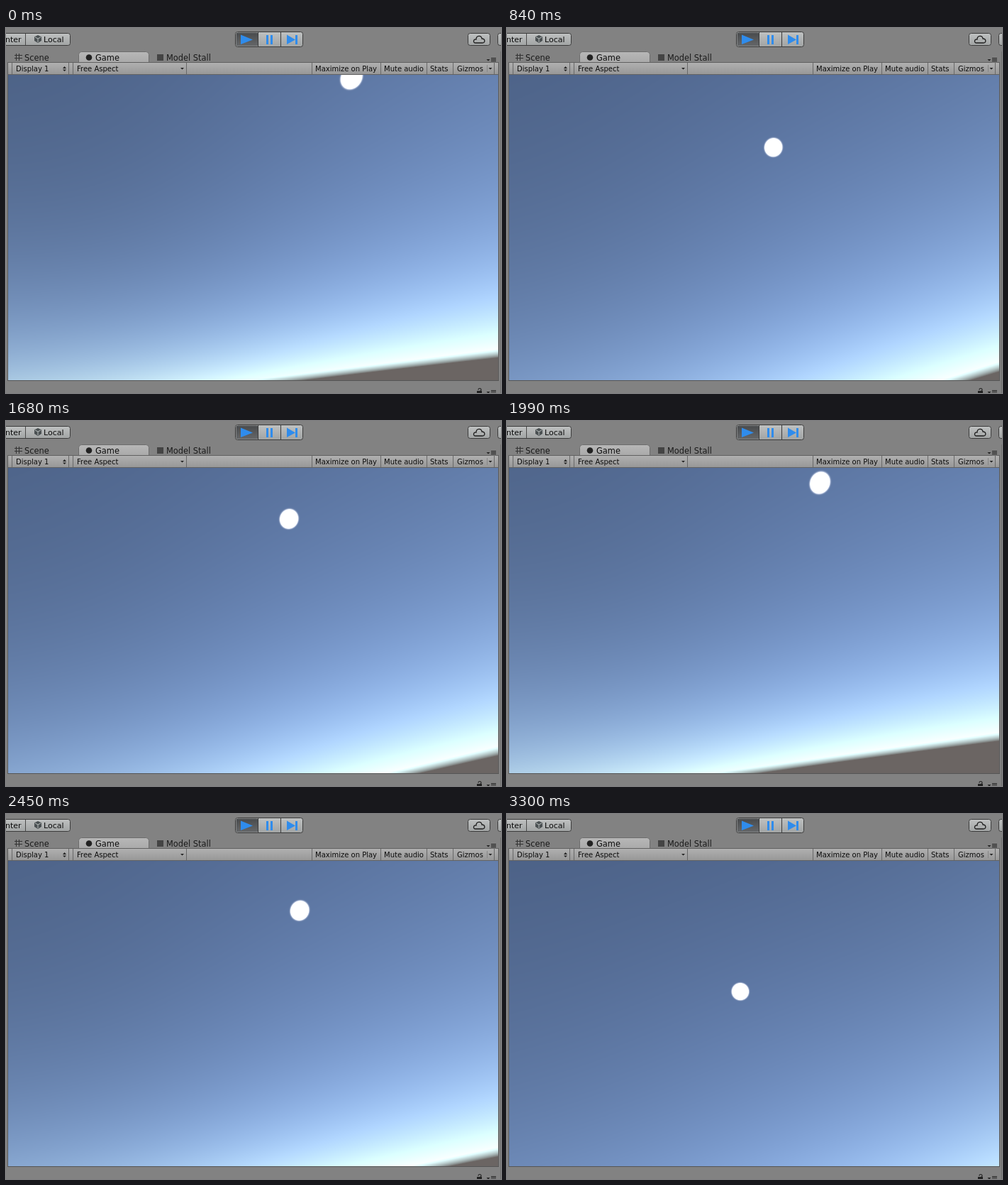
An HTML page with a canvas for the animation above (3.37 s loop, 698x514 px).

```html
<!DOCTYPE html>
<html lang="en">
<head>
<meta charset="utf-8">
<title>Game view</title>
<style>
html, body { margin: 0; width: 100%; height: 100%; overflow: hidden; background: #828282; }
canvas { display: block; }
</style>
</head>
<body>
<canvas id="stage" width="698" height="514"></canvas>
<script>
const ctx = document.getElementById('stage').getContext('2d');
const LOOP = 3370, STEP = 76.7;
const VIEW = { x: 3, y: 66, w: 691, h: 430 };
const FOCAL = VIEW.h / 2 / Math.tan(Math.PI / 6);
const CX = 349, CY = 281;
const SUN_SIN = Math.sin(51.4 * Math.PI / 180);
const SUN_SIZE = 0.04;
const EXPOSURE = 1.3;
const GROUND = [0.369, 0.349, 0.341].map(c => c * c * EXPOSURE);

// time, sun x, sun y, horizon slope
const KEYS = [
  [0, 487, 70, 0.125],
  [380, 466, 122, 0.175],
  [760, 394, 160, 0.27],
  [1050, 333, 185, 0.44],
  [1220, 331, 181, 0.45],
  [1680, 398, 139, 0.24],
  [2080, 450, 76, 0.122],
  [2220, 445, 82, 0.125],
  [2450, 415, 135, 0.21],
  [2680, 350, 202, 0.36],
  [2850, 329, 236, 0.43],
  [3000, 326, 250, 0.43],
  [3220, 329, 253, 0.42],
  [3300, 329, 250, 0.42]
];

function pose(t) {
  const last = KEYS.length - 1;
  let i = 0;
  while (i < last - 1 && KEYS[i + 1][0] <= t) i++;
  const a = KEYS[i], b = KEYS[i + 1];
  const before = KEYS[Math.max(0, i - 1)], after = KEYS[Math.min(last, i + 2)];
  const d = b[0] - a[0], u = Math.min(1, (t - a[0]) / d);
  return [1, 2, 3].map(c => {
    const m0 = (b[c] - before[c]) / (b[0] - before[0]) * d;
    const m1 = (after[c] - a[c]) / (after[0] - a[0]) * d;
    const u2 = u * u, u3 = u2 * u;
    return (2 * u3 - 3 * u2 + 1) * a[c] + (u3 - 2 * u2 + u) * m0
      + (3 * u2 - 2 * u3) * b[c] + (u3 - u2) * m1;
  });
}

// Atmospheric scattering, tabulated over the sine of the elevation
const INV_WAVE = [0.65, 0.57, 0.475].map(w => 1 / w ** 4);
const RAYLEIGH = 0.0025, MIE = 0.001, BRIGHT = 20, OUTER = 1.025, CAM = 1.0001;
const opticalDepth = c => {
  const x = 1 - c;
  return 0.25 * Math.exp(-0.00287 + x * (0.459 + x * (3.83 + x * (-6.8 + x * 5.25))));
};

function scatter(y) {
  const far = Math.sqrt(OUTER * OUTER + y * y - 1) - y;
  const len = far / 2, side = Math.sqrt(1 - y * y);
  const start = Math.exp(-160 * (CAM - 1)) * opticalDepth(y);
  const front = [0, 0, 0];
  for (let s = 0; s < 2; s++) {
    const along = len * (s + 0.5);
    const px = side * along, py = CAM + y * along;
    const height = Math.hypot(px, py);
    const depth = Math.exp(160 * (1 - height));
    const view = (side * px + y * py) / height;
    const path = Math.max(0, start + depth * (opticalDepth(SUN_SIN) - opticalDepth(view)));
    for (let c = 0; c < 3; c++) {
      const k = 4 * Math.PI * (INV_WAVE[c] * RAYLEIGH + MIE);
      front[c] += Math.exp(-path * k) * depth * len * 40;
    }
  }
  return front;
}

const LEVELS = 4096;
const sky = new Float32Array((LEVELS + 1) * 3);
const glow = new Float32Array((LEVELS + 1) * 3);
for (let i = 0; i <= LEVELS; i++) {
  scatter(i / LEVELS).forEach((f, c) => {
    sky[i * 3 + c] = EXPOSURE * f * INV_WAVE[c] * RAYLEIGH * BRIGHT;
    glow[i * 3 + c] = EXPOSURE * f * MIE * BRIGHT * 400 * BRIGHT;
  });
}

const image = ctx.createImageData(VIEW.w, VIEW.h);

function drawSky(t) {
  const [sunX, sunY, slope] = pose(t);
  const sx = sunX - CX, sy = CY - sunY;
  const sunLen = Math.hypot(sx, sy, FOCAL);
  const h = Math.hypot(1, slope), rx = -slope / h, ry = 1 / h;
  // Pitch that keeps the sun at its fixed elevation
  const v = sx * rx + sy * ry;
  const pitch = Math.asin(Math.min(1, sunLen * SUN_SIN / Math.hypot(v, FOCAL))) - Math.atan2(v, FOCAL);
  const ux = rx * Math.cos(pitch), uy = ry * Math.cos(pitch), uz = Math.sin(pitch) * FOCAL;
  const near = 1 - SUN_SIZE * SUN_SIZE / 2;
  const out = image.data;
  let o = 0;
  for (let j = 0; j < VIEW.h; j++) {
    const dy = CY - (VIEW.y + j + 0.5);
    for (let i = 0; i < VIEW.w; i++) {
      const dx = VIEW.x + i + 0.5 - CX;
      const len = Math.sqrt(dx * dx + dy * dy + FOCAL * FOCAL);
      const up = (dx * ux + dy * uy + uz) / len;
      const cos = (dx * sx + dy * sy + FOCAL * FOCAL) / (len * sunLen);
      const phase = 0.75 + 0.75 * cos * cos;
      const n = (up > 0 ? Math.min(LEVELS, Math.round(up * LEVELS)) : 0) * 3;
      const ground = up < 0 ? Math.min(1, -up / 0.02) : 0;
      let spot = 0;
      if (cos > near) {
        const q = Math.sqrt(Math.max(0, 2 - 2 * cos)) / SUN_SIZE;
        spot = 1 - q * q * (3 - 2 * q);
      }
      for (let c = 0; c < 3; c++) {
        let col = Math.min(1.3, sky[n + c] * phase);
        col += (GROUND[c] - col) * ground + glow[n + c] * spot * spot;
        out[o++] = 255 * Math.sqrt(col);
      }
      out[o++] = 255;
    }
  }
  ctx.putImageData(image, VIEW.x, VIEW.y);
}

// Editor chrome
function rect(x, y, w, h, fill) {
  ctx.fillStyle = fill;
  ctx.fillRect(x, y, w, h);
}

function shade(y, h, top, bottom) {
  const g = ctx.createLinearGradient(0, y, 0, y + h);
  g.addColorStop(0, top);
  g.addColorStop(1, bottom);
  return g;
}

function label(text, x, y, size, color = '#0b0b0b') {
  ctx.font = size + 'px "DejaVu Sans", sans-serif';
  ctx.fillStyle = color;
  ctx.fillText(text, x, y);
}

function poly(points, fill) {
  ctx.beginPath();
  points.forEach(([x, y]) => ctx.lineTo(x, y));
  ctx.closePath();
  ctx.fillStyle = fill;
  ctx.fill();
}

function box(x, y, w, h, r, fill, line) {
  ctx.beginPath();
  ctx.roundRect(x + 0.5, y + 0.5, w - 1, h - 1, r);
  ctx.fillStyle = fill;
  ctx.fill();
  if (line) {
    ctx.strokeStyle = line;
    ctx.lineWidth = 1;
    ctx.stroke();
  }
}

const button = (x, y, w, h) => box(x, y, w, h, 3, shade(y, h, '#c0c2c2', '#a0a3a3'), '#3c3c3c');
const arrow = (x, y, s = 2.5) => poly([[x - s, y], [x + s, y], [x, y + s]], '#222');

function menuIcon(x, y) {
  arrow(x + 2, y + 1);
  for (let i = 0; i < 3; i++) rect(x + 6, y - 1 + i * 2, 7, 1, '#222');
}

function drawToolbar() {
  button(-20, 7, 111, 18);
  rect(27, 8, 1, 16, '#4a4a4a');
  label('nter', -1, 20, 11);
  poly([[45, 10], [50, 12.5], [50, 18], [45, 21], [40, 18], [40, 12.5]], '#4a5052');
  ctx.beginPath();
  [[41, 13], [49, 13], [45, 20]].forEach(([x, y]) => {
    ctx.moveTo(45, 15);
    ctx.lineTo(x, y);
  });
  ctx.strokeStyle = '#b8bcbc';
  ctx.lineWidth = 1;
  ctx.stroke();
  label('Local', 53, 20, 11);

  const blue = '#2f8cec';
  button(323, 5, 96, 22);
  box(324, 6, 32, 20, 2, shade(6, 20, '#484a4c', '#66686a'));
  rect(355, 6, 1, 20, '#3c3c3c');
  rect(387, 6, 1, 20, '#3c3c3c');
  poly([[331, 9.5], [348, 16.5], [331, 23]], blue);
  rect(367, 10, 3, 13, blue);
  rect(373, 10, 3, 13, blue);
  poly([[396, 9.5], [408, 16.5], [396, 23]], blue);
  rect(408, 10, 3, 13, blue);

  button(651, 7, 32, 18);
  ctx.beginPath();
  ctx.moveTo(662, 21);
  ctx.bezierCurveTo(658, 21, 659, 15, 663, 16);
  ctx.bezierCurveTo(663, 10, 671, 10, 671, 15);
  ctx.bezierCurveTo(676, 15, 676, 21, 672, 21);
  ctx.closePath();
  ctx.strokeStyle = '#1c1c1c';
  ctx.lineWidth = 1.3;
  ctx.stroke();
  button(693, 7, 30, 18);
}

function drawTabs() {
  box(102, 33, 100, 20, 4, shade(33, 16, '#b8b8b8', '#a9a9a9'), '#6c6c6c');
  for (const d of [15, 19]) {
    rect(d - 1, 36, 1, 10, '#333');
    rect(12, d + 23, 11, 1, '#333');
  }
  label('Scene', 26, 46, 11.4, '#1a1a1a');
  ctx.beginPath();
  ctx.arc(117, 41.5, 4.3, 0, Math.PI * 2);
  ctx.fillStyle = '#222';
  ctx.fill();
  label('Game', 126, 46, 11.4);
  rect(213, 37, 9, 9, '#444');
  label('Model Stall', 226, 46, 11.4, '#1a1a1a');
  menuIcon(678, 43);
}

function drawViewBar() {
  rect(2, 48, 693, 1, '#606060');
  rect(3, 49, 691, 17, shade(49, 17, '#b0b0b0', '#969696'));
  rect(3, 65, 691, 1, '#626262');
  [8, 88, 94, 254, 431, 528, 593, 630, 688].forEach(x => rect(x, 49, 1, 16, '#686868'));
  rect(678, 52, 1, 10, '#858585');
  [['Display 1', 14], ['Free Aspect', 100], ['Maximize on Play', 436],
    ['Mute audio', 533], ['Stats', 598], ['Gizmos', 636]].forEach(([s, x]) => label(s, x, 61, 10));
  poly([[80, 57], [85, 57], [82.5, 54]], '#222');
  arrow(82.5, 58.5);
  arrow(248.5, 56);
  arrow(683, 56);
}

function drawFrame() {
  rect(0, 0, 698, 514, '#828282');
  drawToolbar();
  drawTabs();
  drawViewBar();
  rect(2, 49, 1, 448, '#5c5c5c');
  rect(694, 49, 1, 448, '#5c5c5c');
  rect(2, 496, 693, 1, '#555');
  rect(697, 33, 1, 481, '#707070');
  rect(664, 511, 7, 3, '#222');
  ctx.beginPath();
  ctx.arc(668, 509.5, 2, Math.PI, Math.PI * 2.4);
  ctx.strokeStyle = '#222';
  ctx.lineWidth = 1.2;
  ctx.stroke();
  menuIcon(678, 511);
}

let shown = -1;
const begin = performance.now();

function tick() {
  const t = (performance.now() - begin) % LOOP;
  const step = Math.min(43, Math.floor((t + 8) / STEP));
  if (step !== shown) {
    shown = step;
    drawSky(step * STEP);
  }
  requestAnimationFrame(tick);
}

drawFrame();
tick();
</script>
</body>
</html>
```
